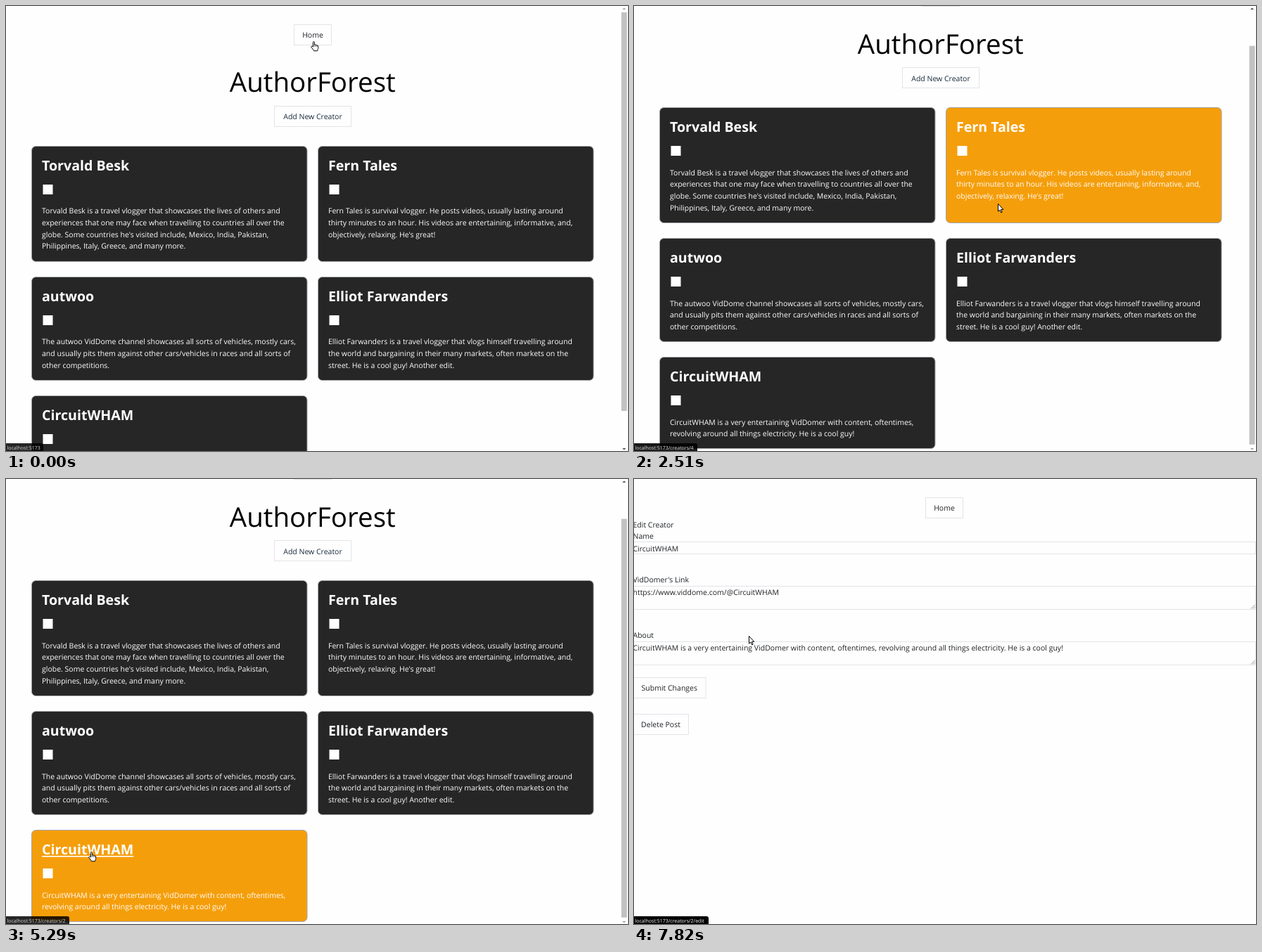
An HTML page with a canvas for the animation above (8000 ms loop, 884 by 633 pixels).

```html
<!DOCTYPE html>
<html lang="en">
<head>
<meta charset="utf-8">
<title>AuthorForest</title>
<style>
  html, body { margin: 0; width: 884px; height: 633px; overflow: hidden; background: #fefefe; }
  canvas { display: block; }
</style>
</head>
<body>
<canvas id="stage" width="884" height="633"></canvas>
<script>
const ctx = document.getElementById('stage').getContext('2d');
const LOOP = 8000;
const FONT = '"Open Sans", "Noto Sans", sans-serif';
const PAPER = '#fefefe', DARK = '#262626', HOT = '#f59e0b', LINE = '#e2e4e8', INK = '#1f2226';
const LEAD = 16.7, MID = 435.7;

const cards = [
  { x: 36, y: 199, h: 165, name: 'Torvald Besk', lines: [
    'Torvald Besk is a travel vlogger that showcases the lives of others and',
    'experiences that one may face when travelling to countries all over the',
    "globe. Some countries he's visited include, Mexico, India, Pakistan,",
    'Philippines, Italy, Greece, and many more.'] },
  { x: 443, y: 199, h: 165, name: 'Fern Tales', lines: [
    'Fern Tales is survival vlogger. He posts videos, usually lasting around',
    'thirty minutes to an hour. His videos are entertaining, informative, and,',
    "objectively, relaxing. He's great!"] },
  { x: 36, y: 385, h: 148, name: 'autwoo', lines: [
    'The autwoo VidDome channel showcases all sorts of vehicles, mostly cars,',
    'and usually pits them against other cars/vehicles in races and all sorts of',
    'other competitions.'] },
  { x: 443, y: 385, h: 148, name: 'Elliot Farwanders', lines: [
    'Elliot Farwanders is a travel vlogger that vlogs himself travelling around',
    'the world and bargaining in their many markets, often markets on the',
    'street. He is a cool guy! Another edit.'] },
  { x: 36, y: 554, h: 131, name: 'CircuitWHAM', lines: [
    'CircuitWHAM is a very entertaining VidDomer with content, oftentimes,',
    'revolving around all things electricity. He is a cool guy!'] }
];
const CARD_W = 392;
const star = cards[4];
const about = star.lines.join(' ');

// time, left, top, shape
const pointer = [
  [0, 433, 50, 'hand'], [150, 436, 100, 'arrow'], [420, 446, 146, 'hand'], [540, 448, 150, 'hand'],
  [660, 448, 154, 'hand'], [930, 452, 154, 'arrow'], [1050, 436, 158, 'arrow'], [1180, 360, 166, 'arrow'],
  [1300, 260, 172, 'arrow'], [1430, 170, 176, 'hand'], [1530, 134, 175, 'hand'], [2210, 134, 195, 'arrow'],
  [2360, 374, 264, 'arrow'], [2510, 517, 281, 'arrow'], [2630, 546, 294, 'arrow'], [2780, 566, 306, 'arrow'],
  [2910, 576, 322, 'arrow'], [3030, 576, 346, 'arrow'], [3330, 540, 374, 'arrow'], [3450, 456, 416, 'arrow'],
  [3570, 350, 446, 'arrow'], [3690, 272, 457, 'arrow'], [4080, 280, 488, 'arrow'], [4200, 284, 539, 'arrow'],
  [4750, 250, 541, 'arrow'], [4870, 198, 541, 'arrow'], [5020, 160, 539, 'arrow'], [5140, 124, 529, 'hand'],
  [5290, 117, 530, 'hand'], [5560, 118, 530, 'arrow'], [5710, 170, 500, 'arrow'], [5830, 246, 450, 'arrow'],
  [5950, 307, 406, 'arrow'], [6100, 257, 386, 'arrow'], [6250, 240, 379, 'beam'], [6370, 227, 376, 'beam'],
  [6520, 290, 388, 'beam'], [6640, 390, 394, 'beam'], [6770, 462, 397, 'beam'], [6920, 484, 398, 'beam'],
  [7040, 484, 398, 'arrow'], [7190, 400, 346, 'arrow'], [7310, 270, 276, 'arrow'], [7430, 176, 232, 'hand'],
  [7580, 163, 223, 'hand'], [7820, 163, 223, 'arrow']
];

// time, path, bar width, opacity
const status = [
  [0, '', 53, 0.85], [150, '', 0, 0], [420, '/addCreator', 94, 1], [1180, '', 0, 0],
  [1530, '/creators/4', 90, 1], [2510, '/creators/4', 90, 0.9], [2630, '/creators/4', 90, 0.5],
  [2780, '', 0, 0], [5290, '/creators/2', 90, 0.85], [5440, '/creators/2', 90, 1],
  [5710, '', 0, 0], [7580, '/creators/2/edit', 106, 1]
];

const scrolls = [[0, 0], [780, 20], [930, 53.5], [1050, 54.6]];

const hand = new Path2D('M3.4 8V1.6C3.4 .2 5.4 .2 5.4 1.6V5.4C5.8 4.6 7.3 4.8 7.4 5.8 7.9 5 9.1 5.4 9.2 6.3 9.9 5.8 10.7 6.2 10.7 7.2V9.5C10.7 11 9.8 11.8 9.6 13.8H4.4C4 12 2.2 10.2 .9 8.8 .1 7.6 1.6 6.8 2.4 7.4Z');
const arrow = new Path2D('M.5 .5V11.2L2.9 9 4.6 12.9 6.2 12.2 4.5 8.4H7.8Z');

const at = (keys, t) => keys.findLast(k => k[0] <= t);
const within = (px, py, x, y, w, h) => px >= x && px < x + w && py >= y && py < y + h;

function text(str, x, y, size = 10.5, color = INK, weight = 400, align = 'left') {
  ctx.font = `${weight} ${size}px ${FONT}`;
  ctx.fillStyle = color;
  ctx.textAlign = align;
  ctx.fillText(str, x, Math.round(y));
  return ctx.measureText(str).width;
}

function rect(x, y, w, h, color) {
  ctx.fillStyle = color;
  ctx.fillRect(x, y, w, h);
}

function frame(x, y, w, h, color = LINE, width = 1) {
  ctx.strokeStyle = color;
  ctx.lineWidth = width;
  ctx.strokeRect(x + 0.5, Math.round(y) + 0.5, w - 1, h - 1);
}

function panel(x, y, w, h, fill) {
  ctx.beginPath();
  ctx.roundRect(x + 0.5, Math.round(y) + 0.5, w - 1, h - 1, 6);
  ctx.fillStyle = fill;
  ctx.fill();
  ctx.strokeStyle = '#a3a6ab';
  ctx.lineWidth = 1;
  ctx.stroke();
}

function button(label, x, y, w, color) {
  frame(x, y, w, 30);
  text(label, x + w / 2, y + 19.3, 10.5, color, 400, 'center');
}

function triangle(y, dir, color) {
  ctx.fillStyle = color;
  ctx.beginPath();
  ctx.moveTo(876, y);
  ctx.lineTo(881, y);
  ctx.lineTo(878.5, y - 2.5 * dir);
  ctx.fill();
}

function scrollbar(s, track) {
  const top = 9 + s * 0.875;
  if (track) rect(874, 37, 9, 587, '#f1f1f1');
  rect(874.5, top, 8, 567, '#c1c1c1');
  triangle(5, 1, s > 0 ? '#505050' : '#a3a3a3');
  triangle(629, -1, s > 54 ? '#a3a3a3' : '#505050');
}

function drawCard(c, s, px, py, shape) {
  const y = c.y - s, x = c.x + 15;
  const hot = within(px, py, c.x, y, CARD_W, c.h);
  panel(c.x, y, CARD_W + 0.5, c.h, hot ? HOT : DARK);
  const w = text(c.name, x, y + 35, 19.6, '#fff', 700);
  if (hot && shape === 'hand' && py < y + 42) rect(x, Math.round(y + 37), w, 1.6, '#fff');
  rect(x + 1.5, Math.round(y + 55), 14, 14, '#fff');
  c.lines.forEach((l, i) => text(l, x, y + 96.3 + i * LEAD, 10.5, '#fff'));
}

function listPage(s, px, py, shape) {
  button('Home', 409, 26 - s, 54);
  text('AuthorForest', MID, 122.4 - s, 38.5, '#000', 400, 'center');
  button('Add New Creator', 381, 142 - s, 110, '#17293a');
  for (const c of cards) drawCard(c, s, px, py, shape);
  scrollbar(s, false);
}

function detailPage(s, t, px) {
  button('Home', 409, 26 - s, 54);
  panel(125, 194, 622, 252, DARK);
  frame(139, 208, 44, 31, '#eee', 1.4);
  text('Edit', 161, 228, 10.5, '#fff', 400, 'center');
  text(star.name, MID, 297.4, 31.3, '#fff', 700, 'center');
  rect(427, 329, 17, 17, '#fff');
  const cut = about.indexOf('around');
  const lines = [about.slice(0, cut), about.slice(cut)];
  lines.forEach((l, i) => {
    if (t >= 6520 && t < 7040) {
      ctx.font = `400 10.5px ${FONT}`;
      const full = ctx.measureText(l).width;
      rect(228, 370 + i * 17, i ? Math.min(full, px - 226) : full, 17, '#0868d4');
    }
    text(l, 228, 383.3 + i * LEAD, 10.5, '#fff');
  });
  scrollbar(s, true);
}

function grip(y) {
  ctx.strokeStyle = '#777';
  ctx.lineWidth = 0.8;
  ctx.beginPath();
  ctx.moveTo(877, y);
  ctx.lineTo(882.5, y - 5.5);
  ctx.moveTo(880, y);
  ctx.lineTo(882.5, y - 2.5);
  ctx.stroke();
}

function editPage() {
  const left = -1.5;
  button('Home', 414, 26, 54);
  text('Edit Creator', left, 69, 10.5);
  text('Name', left, 85);
  frame(-2, 89, 886, 18);
  text(star.name, left, 103);
  text("VidDomer's Link", left, 147);
  frame(-2, 152, 886, 34);
  text('https://www.viddome.com/@' + star.name, left, 165);
  grip(184.5);
  text('About', left, 226);
  frame(-2, 231, 886, 34);
  text(about, left, 244);
  grip(263.5);
  button('Submit Changes', -2, 282, 104.5);
  button('Delete Post', -2, 334, 80);
}

function drawStatus(t) {
  const [, path, w, alpha] = at(status, t);
  if (!w) return;
  ctx.globalAlpha = alpha;
  ctx.fillStyle = '#000';
  ctx.beginPath();
  ctx.roundRect(-4, 622, w + 4, 16, 3);
  ctx.fill();
  text('localhost:5173' + path, 1.5, 631, 7, '#fff');
  ctx.globalAlpha = 1;
}

function drawPointer(x, y, shape) {
  ctx.save();
  ctx.translate(x, y);
  ctx.lineWidth = 1;
  ctx.strokeStyle = '#000';
  ctx.fillStyle = '#fff';
  if (shape === 'beam') {
    rect(0, 0, 5, 1, '#ddd');
    rect(2, 0, 1, 13, '#ddd');
    rect(0, 12, 5, 1, '#ddd');
  } else {
    const p = shape === 'hand' ? hand : arrow;
    ctx.fill(p);
    ctx.stroke(p);
    if (shape === 'hand') {
      ctx.lineWidth = 0.6;
      ctx.stroke(new Path2D('M5.4 5.4V8M7.4 5.8V8M9.2 6.3V8'));
    }
  }
  ctx.restore();
}

function draw(t) {
  const [, x, y, shape] = at(pointer, t);
  const s = at(scrolls, t)[1];
  const hotX = shape === 'hand' ? x + 4 : x;
  ctx.textRendering = 'geometricPrecision';
  rect(0, 0, 884, 633, PAPER);
  if (t < 5440) listPage(s, hotX, y, shape);
  else if (t < 7700) detailPage(s, t, x);
  else editPage();
  drawStatus(t);
  drawPointer(x, y, shape);
}

const start = performance.now();
function tick() {
  draw((performance.now() - start) % LOOP);
  requestAnimationFrame(tick);
}
tick();
</script>
</body>
</html>
```
